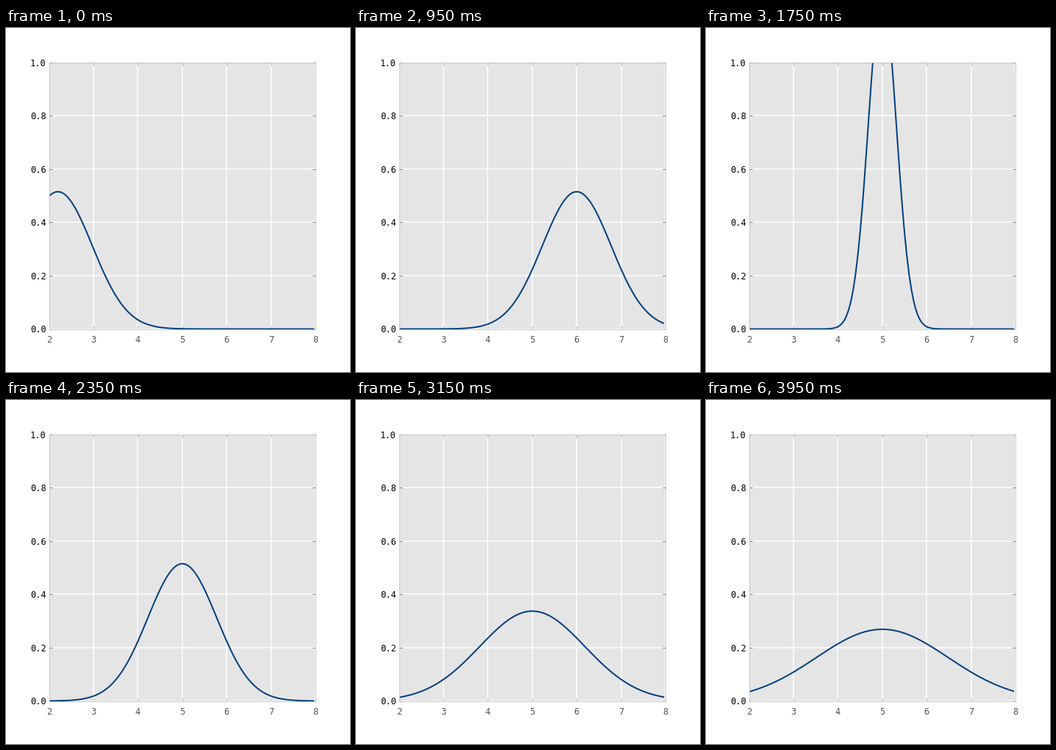
A matplotlib script that plays this animation: 468x468 px, repeating every 4000 ms.

```python
import numpy as np
import matplotlib.pyplot as plt
from matplotlib.animation import FuncAnimation

FRAMES, INTERVAL = 80, 50

plt.rcParams.update({
    "font.family": "DejaVu Sans Mono",
    "font.size": 12,
    "axes.edgecolor": "#bcbcbc",
    "axes.linewidth": 0.8,
})


def mean_at(i):
    """Climb from 2.2 to 6, pause, then settle back at 5."""
    up = min(i + 1, 20)
    down = np.clip(i - 20, 0, 5)
    return 2 + 0.2 * (up - down)


def var_at(i):
    """Narrow from 0.6 to 0.05, then widen steadily."""
    shrink = np.clip(i - 25, 0, 11)
    grow = max(i - 36, 0)
    return 0.6 + 0.05 * (grow - shrink)


def gaussian(x, mean, var):
    return np.exp(-(x - mean) ** 2 / (2 * var)) / np.sqrt(2 * np.pi * var)


fig = plt.figure(figsize=(6.5, 6.5), dpi=72, facecolor="white")
ax = fig.add_axes([0.125, 0.125, 0.775, 0.775], facecolor="#e5e5e5")
ax.set(xlim=(2, 8), ylim=(0, 1))
ax.set_xticks(range(2, 9))
ax.set_yticks(np.linspace(0, 1, 6))
ax.set_axisbelow(True)
ax.grid(color="white", linestyle="-", linewidth=1.5)
ax.tick_params(direction="in", length=4, width=0.5, top=True, right=True)
ax.tick_params(axis="x", color="#555555", labelcolor="#555555", pad=8)
ax.tick_params(axis="y", color="black", labelcolor="black", pad=4)

x = 2 + 0.05 * np.arange(120)
curve, = ax.plot(x, gaussian(x, mean_at(0), var_at(0)),
                 color="#004080", linewidth=2)


def update(i):
    curve.set_ydata(gaussian(x, mean_at(i), var_at(i)))
    return curve,


anim = FuncAnimation(fig, update, frames=FRAMES, interval=INTERVAL,
                     repeat=True, repeat_delay=0)
plt.show()
```
